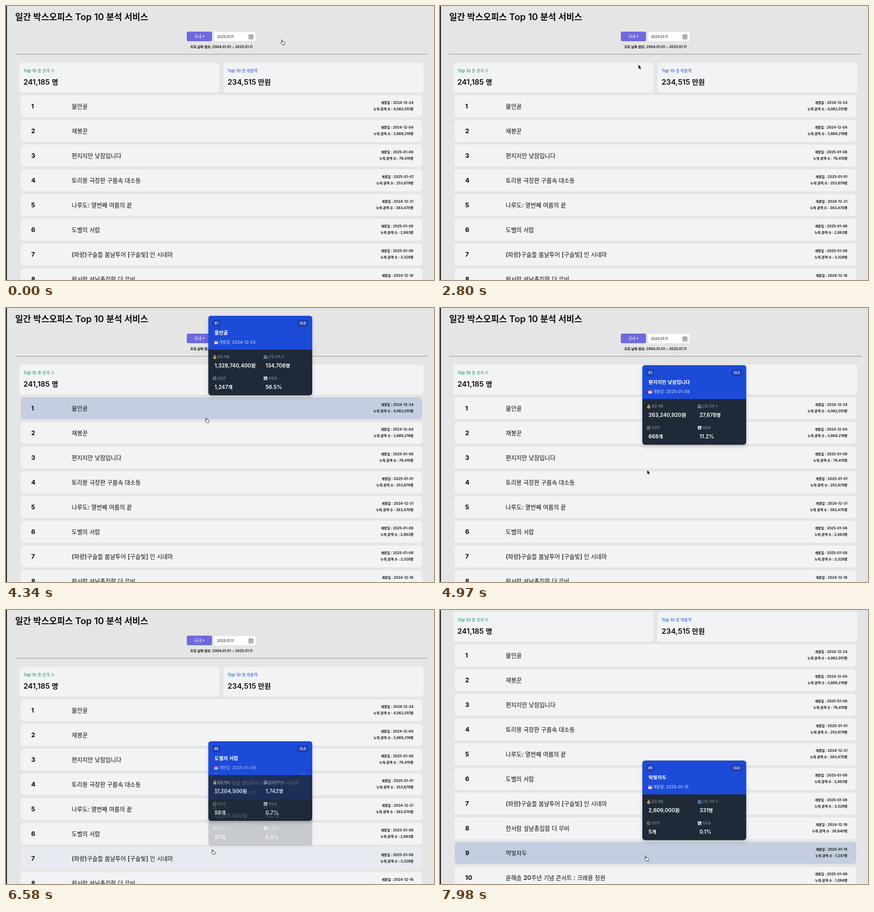
Animation of 935x599 px, one loop 8 s. Source, as an HTML page:

```html
<!DOCTYPE html>
<html lang="ko">
<head>
<meta charset="utf-8">
<title>Top 10</title>
<style>
html, body { margin: 0; width: 100%; height: 100%; overflow: hidden; background: #e5e5e5; }
body { position: relative; color: #0c0c0d; font-family: Inter, "Noto Sans CJK KR", "Noto Sans CJK", sans-serif; }
div, svg { position: absolute; }
#page { left: 0; top: 0; width: 935px; }
#edge { left: 0; top: 0; width: 1.5px; height: 599px; background: #151515; }
.t { height: 0; line-height: 0; white-space: pre; }
.k { font-size: .94em; }
.right { transform: translateX(-100%); }
.mid { transform: translateX(-50%); }
.rule { left: 20px; width: 901px; height: 1px; background: #8b8b8b; }
.button { left: 394.7px; top: 55.8px; width: 55.3px; height: 21.4px; border-radius: 3px; background: #6f69dc; }
.input { left: 455px; top: 57px; width: 90px; height: 19.5px; border-radius: 2px; background: #fff; }
.sum { top: 123.5px; width: 437px; height: 65.5px; border-radius: 6px; background: #f2f3f5; }
.row { left: 32px; width: 877px; height: 48px; border-radius: 7px; background: #f2f3f5; }
.glow { inset: 0; border-radius: 7px; background: #c5cee0; }
.tip { left: 441.7px; width: 227.5px; height: 173.8px; border-radius: 6px; box-shadow: 0 4px 8px rgba(0,0,0,.16); }
.pop { inset: 0; border-radius: 6px; overflow: hidden; background: #1f2937; color: #fff; }
.head { left: 0; top: 0; width: 100%; height: 74.4px; background: #1c4bd8; }
.badge { top: 9px; height: 15px; border-radius: 3px; background: #1e3fae; }
#veil { left: 20px; top: 114px; width: 901px; height: 89px; border-radius: 8px; background: rgba(0,0,0,.25); }
.bar { width: 2.4px; height: 21px; top: 148px; border-radius: 1px; background: #1c1c1c; }
.busy { display: none; }
.loading .busy { display: block; }
.loading .live { display: none; }
.loading #summary { filter: blur(2px); }
#cursor { left: 0; top: 0; overflow: visible; }
</style>
</head>
<body>
<div id="page"></div>
<div id="edge"></div>
<svg id="cursor" width="12" height="14">
  <path id="arrow" d="M0 0V9.6L2.2 7.6L3.8 11L5.4 10.3L3.9 7H6.9Z" fill="#000" stroke="#fff" stroke-width=".6"/>
  <path id="hand" transform="translate(-2.6 0)" d="M1.7 6.5V1.2a.9.9 0 0 1 1.8 0V4l4 .9c.8.2 1.2.8 1 1.8L7.9 10.8H3.2L.2 7.2c-.6-1 .6-1.7 1.5-.7z" fill="#fff" stroke="#111" stroke-width=".9"/>
</svg>
<script>
const LOOP = 8000, ROW_TOP = 195, PITCH = 54, ROW_HEIGHT = 48;
const LOADING = { from: 280, to: 2250 };
const SCROLL = { start: 7275, distance: 120.5, decay: 138 };
const DAY_SALES = 2351.7e6;

// title | release | total audience | daily sales | daily audience | screens
const films = `
물안골 | 2024-12-24 | 4,062,051 | 1,328,740,400 | 134,708 | 1,247
재봉꾼 | 2024-12-04 | 3,669,219 | 289,514,200 | 29,856 | 812
편지지만 낮잠입니다 | 2025-01-08 | 79,415 | 263,240,920 | 27,678 | 668
토리몽 극장판 구름속 대소동 | 2025-01-01 | 253,679 | 182,437,600 | 20,318 | 694
나루도: 열번째 여름의 끝 | 2024-12-31 | 383,470 | 136,820,140 | 14,127 | 661
도벨의 서랍 | 2025-01-08 | 2,863 | 17,204,500 | 1,742 | 98
(파랑)구슬들 봄날투어 [구슬빛] 인 시네마 | 2025-01-08 | 3,328 | 12,675,000 | 507 | 67
한서람 설날총집합 더 무비 | 2024-12-18 | 26,840 | 11,000,000 | 440 | 7
먹빛자두 | 2025-01-15 | 1,247 | 2,609,000 | 331 | 5
윤해솜 20주년 기념 콘서트 : 크레용 정원 | 2025-01-09 | 1,094 | 2,150,000 | 215 | 3
`.trim().split('\n').map(line => line.split(' | '));

// Where the pointer rests, and when it arrives and leaves
const stops = [
  { x: 603, y: 74, at: 0, until: 280 },
  { x: 428.5, y: 109.5, at: 1960, until: 1960 },
  { x: 432.5, y: 121, at: 2520, until: 2730 },
  { x: 437, y: 157, at: 3080, until: 3340 },
  { x: 430, y: 215.5, at: 3500, until: 3920 },
  { x: 440, y: 248, at: 4480, until: 4600 },
  { x: 452.5, y: 354, at: 4930, until: 4980 },
  { x: 455, y: 380, at: 5300, until: 5460 },
  { x: 457, y: 459.5, at: 5820, until: 5890 },
  { x: 455, y: 490, at: 6230, until: 6300 },
  { x: 449.5, y: 537.5, at: 6700, until: LOOP }
];

const hangul = s => s.replace(/[가-힣]+/g, '<span class="k">$&</span>');
const text = (x, y, size, weight, s, cls = '', color = 'inherit') =>
  `<div class="t ${cls}" style="left:${x}px;top:${y}px;font-size:${size}px;font-weight:${weight};color:${color}">${hangul(s)}</div>`;
const icon = (x, y, shapes) =>
  `<svg style="left:${x}px;top:${y}px" width="11" height="11">${shapes}</svg>`;

const icons = {
  date: '<path d="M1 1h8v8H1z" fill="#e8ebf2"/><path d="M1 1h8v3H1z" fill="#c9574e"/><path d="M2 6h6M2 7.7h6" stroke="#8994ab" stroke-width=".7"/>',
  money: '<path d="M3 1h4L6 3.3C10 6 9 9.4 5 9.4S0 6 4 3.3z" fill="#d9a75b"/><path d="M4 3.3h2" stroke="#8a5a24"/><circle cx="5" cy="6.5" r="1.2" fill="#8a6425"/>',
  people: '<g fill="#5d7fa6"><circle cx="3" cy="3" r="2"/><circle cx="7" cy="3" r="2"/><path d="M0 9q0-4 3-4t3 4zM5 9q0-4 2.5-4T10 9z"/></g>',
  clapper: '<path d="M1 4h8v5H1z" fill="#59616c"/><path d="M1 3.6 8.6 1" stroke="#d8dadd" stroke-width="1.6" stroke-dasharray="1.5 1"/>',
  chart: '<path d="M1 1h8v8H1z" fill="#dfe5ea"/><path d="M2.7 9V4" stroke="#45a35b" stroke-width="1.5"/><path d="M5 9V2" stroke="#d3544b" stroke-width="1.5"/><path d="M7.3 9V5" stroke="#3b7fd0" stroke-width="1.5"/>',
  calendar: '<path d="M.7 1.7h8.8v8.4H.7zM.7 4.3h8.8M3 0v2.8M7.2 0v2.8M2.5 6.2h5.2M2.5 8.1h5.2" fill="none" stroke="#333" stroke-width=".8"/>',
  caret: '<path d="M0 .3h5L2.5 3z" fill="#fff"/>'
};

const summary = (x, color, label, total, unit) => `
  <div class="sum" style="left:${x}px">
    ${text(9, 18.5, 9.2, 500, label, '', color)}
    ${text(9, 42.5, 16.2, 600, `${total} ${unit}`, 'live')}
    ${text(9, 42.5, 16.2, 600, `- ${unit}`, 'busy')}
  </div>`;

const row = ([title, date, total], i) => `
  <div class="row live" style="top:${ROW_TOP + i * PITCH}px">
    <div class="glow"></div>
    ${text(23, 24, 13.8, 700, String(i + 1))}
    ${text(111.5, 24, 13.5, 500, title)}
    ${text(858, 17, 7.7, 600, `개봉일 : ${date}`, 'right')}
    ${text(858, 31, 7.7, 600, `누적 관객 수 : ${total}명`, 'right')}
  </div>`;

const field = (x, y, image, label, value) =>
  icon(x, y - 5, icons[image]) + text(x + 11, y, 7, 400, label, '', '#9ca3af') +
  text(x + 4.5, y + 18.8, 11.4, 600, value);

const popup = ([title, date, , sales, audience, screens], i) => {
  const share = (100 * sales.replaceAll(',', '') / DAY_SALES).toFixed(1);
  return `
  <div class="tip" style="top:${16.8 + i * PITCH}px">
    <div class="pop">
      <div class="head"></div>
      <div class="badge" style="left:9px;width:17px"></div>
      <div class="badge" style="left:195px;width:23px"></div>
      ${text(17.7, 16.8, 6.9, 600, '#' + (i + 1), 'mid')}
      ${text(206.7, 16.8, 6.9, 600, 'OLD', 'mid')}
      ${text(13.7, 37.5, 11.3, 600, title)}
      ${icon(12.5, 53.2, icons.date)}
      ${text(23.5, 58.2, 9.1, 400, `개봉일: ${date}`, '', '#d3defa')}
      ${field(9.3, 90, 'money', '일일 매출', sales + '원')}
      ${field(120.8, 90, 'people', '당일 관객 수', audience + '명')}
      ${field(9.3, 137.5, 'clapper', '상영관', screens + '개')}
      ${field(120.8, 137.5, 'chart', '점유율', share + '%')}
    </div>
  </div>`;
};

const page = document.getElementById('page');
page.innerHTML = `
  ${text(20, 23.5, 20, 600, '일간 박스오피스 Top 10 분석 서비스')}
  <div class="button"></div>
  ${text(411, 66.8, 9.2, 400, '국내', '', '#fff')}
  ${icon(429, 65, icons.caret)}
  <div class="input"></div>
  ${text(461, 67, 7.8, 400, '2025.01.11')}
  ${icon(529.7, 61.5, icons.calendar)}
  ${text(470.5, 90, 7.7, 600, '조회 날짜 범위: 2004.01.01 ~ 2025.01.11', 'mid')}
  <div class="rule" style="top:104.5px"></div>
  <div id="summary">
    ${summary(29, '#24966f', 'Top 10 총 관객 수', '241,185', '명')}
    ${summary(475, '#2b60d9', 'Top 10 총 매출액', '234,515', '만원')}
  </div>
  ${films.map(row).join('')}
  <div class="busy">
    <div id="veil"></div>
    ${[0, 1, 2, 3, 4].map(i => `<div class="bar" style="left:${460 + i * 4.6}px"></div>`).join('')}
    <div class="rule" style="top:211.5px"></div>
    ${text(470.5, 232.5, 9.2, 400, 'e-mail: dev.sorimok@narum.test', 'mid')}
    ${text(470.5, 251, 9.2, 400, 'Data Resource by <b>http://www.tomari.test</b>', 'mid')}
  </div>
  ${films.map(popup).join('')}`;

const all = s => [...document.querySelectorAll(s)];
const glows = all('.glow'), tips = all('.tip'), bars = all('.bar');
const [cursor, arrow, hand] = ['cursor', 'arrow', 'hand'].map(id => document.getElementById(id));

const ramp = (t, start, duration) => Math.min(1, Math.max(0, (t - start) / duration));
const isLoading = t => t >= LOADING.from && t < LOADING.to;
const scrollAt = t =>
  t < SCROLL.start ? 0 : SCROLL.distance * (1 - Math.exp((SCROLL.start - t) / SCROLL.decay));

function pointerAt(t) {
  const i = stops.findLastIndex(s => s.at <= t);
  const from = stops[i], to = stops[i + 1] ?? from;
  const u = t <= from.until ? 0 : ramp(t, from.until, to.at - from.until);
  return { x: from.x + (to.x - from.x) * u, y: from.y + (to.y - from.y) * u };
}

function hoveredRow(t) {
  const depth = pointerAt(t).y + scrollAt(t) - ROW_TOP;
  return !isLoading(t) && depth >= 0 && depth % PITCH < ROW_HEIGHT ? Math.floor(depth / PITCH) : -1;
}

// The pointer passes every row at most once per loop.
const visits = films.map(() => ({ enter: Infinity, leave: Infinity }));
for (let t = 0, last = -1; t < LOOP; t++) {
  const now = hoveredRow(t);
  if (now !== last) {
    if (last >= 0) visits[last].leave = t;
    if (now >= 0) visits[now].enter = t;
  }
  last = now;
}

const fade = (t, { enter, leave }, fadeIn, hold, fadeOut) =>
  t < enter ? 0 : ramp(t, enter, fadeIn) * (t < leave + hold ? 1 : 1 - ramp(t, leave + hold, fadeOut));

function render(t) {
  const { x, y } = pointerAt(t);
  page.classList.toggle('loading', isLoading(t));
  page.style.transform = `translateY(${-scrollAt(t)}px)`;

  visits.forEach((visit, i) => {
    const opacity = fade(t, visit, 180, 100, 100);
    glows[i].style.opacity = fade(t, visit, 150, 0, 30);
    tips[i].style.opacity = opacity;
    tips[i].style.visibility = opacity ? 'visible' : 'hidden';
  });
  bars.forEach((el, i) => {
    const phase = (t - 1960) / 1200 + .5 - i * .12;
    el.style.transform = `scaleY(${.7 + .3 * Math.cos(phase * 2 * Math.PI)})`;
  });

  const pointing = t < 140 || hoveredRow(t) >= 0;
  hand.style.display = pointing ? '' : 'none';
  arrow.style.display = pointing ? 'none' : '';
  cursor.style.transform = `translate(${x}px, ${y}px)`;
}

let start;
function tick(now) {
  start ??= now;
  render((now - start) % LOOP);
  requestAnimationFrame(tick);
}
render(0);
requestAnimationFrame(tick);
</script>
</body>
</html>
```
